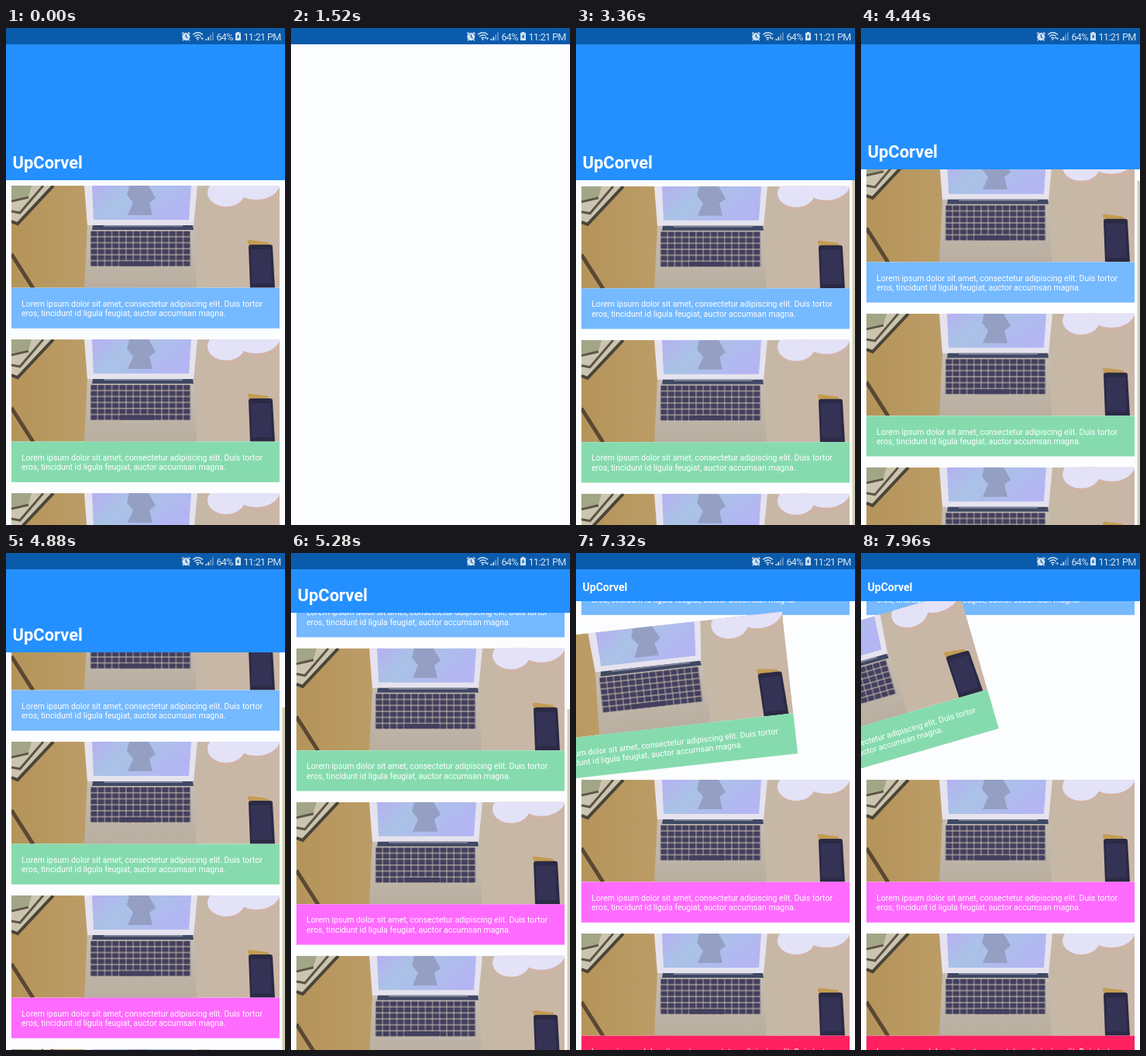
An HTML page that plays this animation: 360x640 px, repeating every 8 s.

```html
<!DOCTYPE html>
<html lang="en">
<head>
<meta charset="utf-8">
<title>Swipeable card list</title>
<style>
  html, body { margin: 0; width: 100%; height: 100%; overflow: hidden; background: #fcfdff; }
  svg { display: block; width: 360px; height: 640px; }
  text { font-family: Roboto, sans-serif; fill: #fff; }
  .status text { font-size: 12.6px; letter-spacing: -.65px; fill: #d3e6f3; }
  .copy { font-size: 10.52px; }
  .title { font-weight: 700; }
</style>
</head>
<body>
<svg viewBox="0 0 360 640" width="360" height="640">
  <defs>
    <linearGradient id="desk">
      <stop offset="0" stop-color="#b5945a"/>
      <stop offset=".28" stop-color="#bc9c66"/>
      <stop offset=".66" stop-color="#c6b8a6"/>
      <stop offset="1" stop-color="#cab6a6"/>
    </linearGradient>
    <linearGradient id="screen" x2="1" y2=".4">
      <stop offset="0" stop-color="#b6b0f2"/>
      <stop offset=".4" stop-color="#a9c3e6"/>
      <stop offset="1" stop-color="#b3b6f3"/>
    </linearGradient>
    <linearGradient id="base" x2="0" y2="1">
      <stop offset="0" stop-color="#c6beb4"/>
      <stop offset="1" stop-color="#b9ae9f"/>
    </linearGradient>
    <pattern id="keys" x="102" y="58" width="9.2" height="7.7" patternUnits="userSpaceOnUse">
      <rect x=".5" y=".8" width="8.1" height="6.1" rx="1" fill="#433f5e"/>
    </pattern>
    <clipPath id="photoClip"><rect width="346" height="131.5"/></clipPath>
    <g id="photo" clip-path="url(#photoClip)">
      <rect width="346" height="132" fill="url(#desk)"/>
      <path d="M0 0H53L7 48 0 46Z" fill="#cbc5b0"/>
      <path d="M0 0H26L22 14 0 18Z" fill="#a3a587"/>
      <path d="M0 33L11 35 41 0M0 20L22 15" fill="none" stroke="#5d5546" stroke-width="3"/>
      <path d="M0 46L8 49 54 0" fill="none" stroke="#4b4438" stroke-width="4"/>
      <path d="M0 88L28 132" stroke="#5a4832" stroke-width="5"/>
      <path d="M94 0H240L235 52H98Z" fill="#e6e3ef"/>
      <path d="M104 0H232L229 44H106Z" fill="url(#screen)"/>
      <path d="M152 0H177L186 16 178 22 182 38H150L157 22 149 12Z" fill="#959fc4"/>
      <path d="M98 51H236L239 132H94Z" fill="url(#base)"/>
      <path d="M105 51H234L235 57H104Z" fill="#3f4864"/>
      <path d="M119 51H221V53H119Z" fill="#7d8296"/>
      <path d="M102 58H231L232 104H101Z" fill="#a49c98"/>
      <rect x="102" y="58" width="129" height="46.2" fill="url(#keys)"/>
      <rect x="139" y="97.3" width="46" height="6" rx="1" fill="#433f5e"/>
      <ellipse cx="278" cy="12" rx="24" ry="19" fill="#cfb4a5"/>
      <ellipse cx="316" cy="-1" rx="32" ry="23" fill="#cfb4a5"/>
      <ellipse cx="277" cy="9" rx="24" ry="18" fill="#e3e2f7"/>
      <ellipse cx="316" cy="-4" rx="31" ry="22" fill="#e3e2f7"/>
      <path d="M305 72Q304 70 308 70L331 73 334 78 307 82Z" fill="#c39c54"/>
      <path d="M306 79Q306 76 310 76H334Q337 76 337 79L340 132H308Z" fill="#2b2a45"/>
      <path d="M309 82H334L336 126H310Z" fill="#343356"/>
    </g>
  </defs>

  <rect width="360" height="640" fill="#fcfdff"/>
  <g id="app">
    <g id="list"></g>
    <rect id="bar" x="356.5" width="3.5" fill="#d4ceb2"/>
    <rect id="header" y="21" width="360" fill="#2490ff"/>
    <text id="title" class="title" x="8.6">UpCorvel</text>
  </g>

  <g class="status">
    <rect width="360" height="21" fill="#0b5bac"/>
    <g fill="#cfe2f1">
      <circle cx="232.3" cy="11.2" r="5"/>
      <path d="M227 7.6L229.4 5.4M235.2 5.4L237.6 7.6M229 15L227.8 16.3M235.6 15L236.8 16.3" stroke="#cfe2f1" stroke-width="1.4"/>
      <path d="M232.3 8.2V11.4L234.6 12.7" fill="none" stroke="#0b5bac" stroke-width="1.2"/>
      <g fill="none" stroke="#cfe2f1" stroke-width="1.3">
        <path d="M241 8.6Q247.5 3 254 8.6"/>
        <path d="M243.2 11Q247.5 7.3 251.6 10.6"/>
        <path d="M245.3 13.2Q247.5 11.4 249.2 13"/>
      </g>
      <circle cx="247.4" cy="14.8" r="1.1"/>
      <path id="up" d="M249.4 13.4L251 10.8 252.4 13.4Z"/>
      <path d="M251.8 12.6H255L253.4 15.4Z"/>
      <path d="M257.5 14H259.3V16H257.5ZM260.4 11.6H262.2V16H260.4Z"/>
      <path d="M263.3 8.6H265V16H263.3ZM266 5.6H267.7V16H266Z" opacity=".45"/>
      <path d="M298 5H301V6.2H303V16H296V6.2H298Z"/>
      <path d="M300.5 7.6L297.6 11.5H299.2L298.6 14.4 301.5 10.4H299.9Z" fill="#0b5bac"/>
    </g>
    <text x="271.4" y="15.6">64%</text>
    <text x="306.4" y="15.6">11:21 PM</text>
  </g>
</svg>
<script>
const LOOP = 8000, STEP = 40;
const CARD = { x: 7, top: 203.1, w: 346, photo: 131.5, h: 183.7, pitch: 198 };
const COLORS = ['#75b9ff', '#86dbae', '#ff6aff', '#ff2060'];
const COPY = [
  'Lorem ipsum dolor sit amet, consectetur adipiscing elit. Duis tortor',
  'eros, tincidunt id ligula feugiat, auctor accumsan magna.'
];

// [time, value] pairs, joined by a smooth curve without overshoot
const SCROLL = [[2920, -0.7], [3560, -0.7], [3760, 0], [4160, 3], [4560, 55],
  [4880, 158], [5280, 278.3], [5400, 296], [6080, 296], [6280, 307]];
const SWIPE = [[6360, 0], [6520, -16.5], [6840, -18], [7000, -18], [7400, -94],
  [7800, -177], [7960, -194]];

const $ = id => document.getElementById(id);
const clamp = v => Math.min(1, Math.max(0, v));
const ramp = (t, from, to) => clamp((t - from) / (to - from));
const set = (node, attrs) => {
  for (const name in attrs) node.setAttribute(name, attrs[name]);
};

function add(parent, tag, attrs, text = '') {
  const node = document.createElementNS('http://www.w3.org/2000/svg', tag);
  set(node, attrs);
  node.textContent = text;
  return parent.appendChild(node);
}

function curve(keys, t) {
  const last = keys.length - 1;
  if (t <= keys[0][0]) return keys[0][1];
  if (t >= keys[last][0]) return keys[last][1];
  const slope = i => (keys[i + 1][1] - keys[i][1]) / (keys[i + 1][0] - keys[i][0]);
  const tangent = i => {
    if (i === 0 || i === last) return 0;
    const a = slope(i - 1), b = slope(i);
    return a * b > 0 ? 2 * a * b / (a + b) : 0;
  };
  const i = keys.findIndex((key, n) => n < last && t < keys[n + 1][0]);
  const [t0, v0] = keys[i], [t1, v1] = keys[i + 1];
  const d = t1 - t0, u = (t - t0) / d;
  const bend = u * (1 - u) * d * (tangent(i) * (1 - u) - tangent(i + 1) * u);
  return v0 + (v1 - v0) * u * u * (3 - 2 * u) + bend;
}

const cards = COLORS.map(fill => {
  const card = add($('list'), 'g', {});
  add(card, 'use', { href: '#photo' });
  add(card, 'rect', { y: CARD.photo, width: CARD.w, height: CARD.h - CARD.photo, fill });
  COPY.forEach((line, i) =>
    add(card, 'text', { class: 'copy', x: 13, y: 155.7 + i * 12.2 }, line));
  return card;
});

function appOpacity(t) {
  if (t < 2000) return t < 1200 ? 1 : t < 1240 ? 0.5 : 0;
  return ramp(t, 2880, 3040);
}

function draw(t) {
  const scroll = t < 2000 ? 0 : curve(SCROLL, t);
  const swipe = curve(SWIPE, t);
  const down = Math.max(0, scroll);
  $('app').setAttribute('opacity', appOpacity(t));

  cards.forEach((card, i) => {
    const dx = i === 1 ? swipe : 0;
    const y = CARD.top + i * CARD.pitch - scroll;
    const turn = `rotate(${dx / 12} ${CARD.w / 2} ${CARD.h / 2})`;
    card.setAttribute('transform', `translate(${CARD.x + dx} ${y}) ${turn}`);
  });

  // the header folds with the scroll, the title shrinks at the very end
  const bottom = Math.round(196 - down * 0.429 - Math.max(0, down - 296) * 0.2);
  const small = ramp(scroll, 296, 307);
  set($('header'), { height: bottom - 21 });
  set($('title'), { y: bottom - 15 + 2 * small, 'font-size': 21.9 - 7.9 * small });

  const barTop = 196 + down * 0.018;
  const barAlpha = t < 2000 ? 0 : 1 - ramp(t, 6280, 6480);
  set($('bar'), { y: barTop, height: 640 - barTop, opacity: barAlpha });

  $('up').setAttribute('opacity', t >= 1520 && t < 5640 ? 1 : 0.5);
}

function tick(now) {
  draw(Math.floor(now % LOOP / STEP) * STEP);
  requestAnimationFrame(tick);
}
draw(0);
requestAnimationFrame(tick);
</script>
</body>
</html>
```
